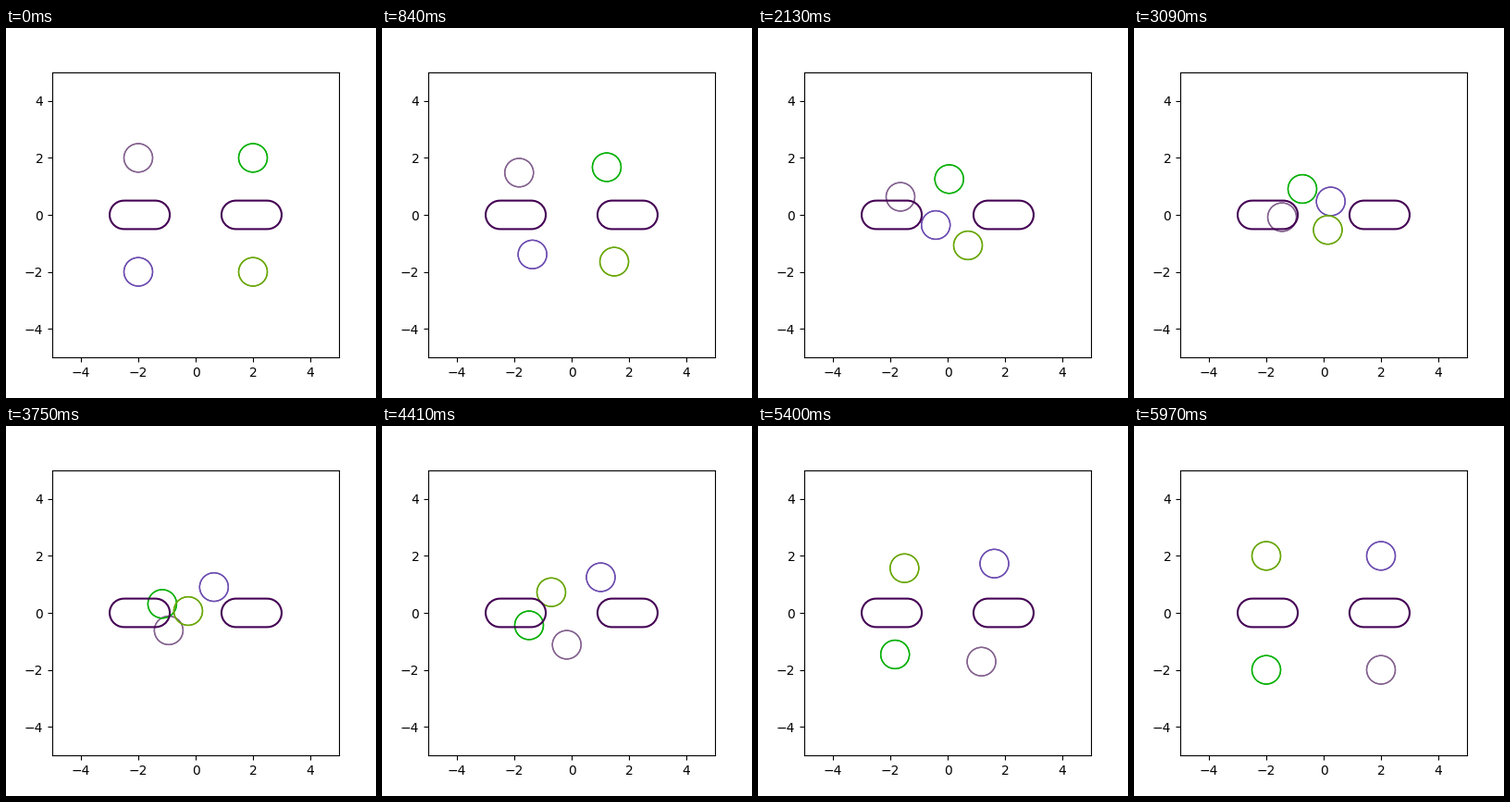
Write a matplotlib script that moves like this. It is 400 px wide and 400 px high and loops after 6 s.

```python
import numpy as np
import matplotlib.pyplot as plt
from matplotlib.animation import FuncAnimation
from matplotlib.patheffects import Normal

FRAMES, INTERVAL = 200, 30
RADIUS = 0.5

# Each agent crosses to the opposite corner through three key points
KNOTS = np.array([0, 71, 103, 147, FRAMES - 1], float)
AGENTS = [
    ("#84628f", (-2, 2), [(-1.645, 0.633), (-1.45, -0.08), (-0.17, -1.12)]),
    ("#04b004", (2, 2), [(0.055, 1.256), (-0.742, 0.909), (-1.484, -0.438)]),
    ("#6c4cb0", (-2, -2), [(-0.413, -0.357), (0.248, 0.471), (1.016, 1.25)]),
    ("#68a604", (2, -2), [(0.71, -1.071), (0.145, -0.529), (-0.71, 0.724)]),
]


def natural_spline(t, p, x):
    """Natural cubic spline through points p at times t, sampled at x."""
    h, n = np.diff(t), len(t)
    a, b = np.eye(n), np.zeros_like(p)
    slope = np.diff(p, axis=0) / h[:, None]
    for i in range(1, n - 1):
        a[i, i - 1:i + 2] = h[i - 1], 2 * (h[i - 1] + h[i]), h[i]
        b[i] = 6 * (slope[i] - slope[i - 1])
    m = np.linalg.solve(a, b)
    k = np.clip(np.searchsorted(t, x, side="right") - 1, 0, n - 2)
    u, hk = (x - t[k])[:, None], h[k][:, None]
    c1 = slope[k] - hk * (2 * m[k] + m[k + 1]) / 6
    return p[k] + u * (c1 + u * (m[k] / 2 + u * (m[k + 1] - m[k]) / (6 * hk)))


def agent_path(start, via):
    end = (-start[0], -start[1])
    points = np.array([start, *via, end], float)
    return natural_spline(KNOTS, points, np.arange(FRAMES))


def draw_capsule(ax, x0, x1):
    """Outline of all points at RADIUS from the segment x0..x1 on y = 0."""
    x, y = np.meshgrid(*[np.linspace(-5, 5, 100)] * 2)
    dist = np.hypot(x - np.clip(x, x0, x1), y)
    ax.contour(x, y, dist, levels=[RADIUS], colors="#440154", linewidths=1.5)


fig, ax = plt.subplots(figsize=(4, 4), dpi=100)
draw_capsule(ax, -2.5, -1.4)
draw_capsule(ax, 1.4, 2.5)
ax.set(xlim=(-5, 5), ylim=(-5, 5))

paths = [agent_path(start, via) for _, start, via in AGENTS]
# Stroking twice gives the thin rings a crisp edge
circles = [ax.add_patch(plt.Circle(start, RADIUS, fill=False, ec=color, lw=1,
                                   path_effects=[Normal(), Normal()]))
           for color, start, _ in AGENTS]


def update(i):
    for circle, path in zip(circles, paths):
        circle.center = path[i]
    return circles


anim = FuncAnimation(fig, update, frames=FRAMES, interval=INTERVAL,
                     repeat=True, repeat_delay=0, blit=False)
plt.show()
```
